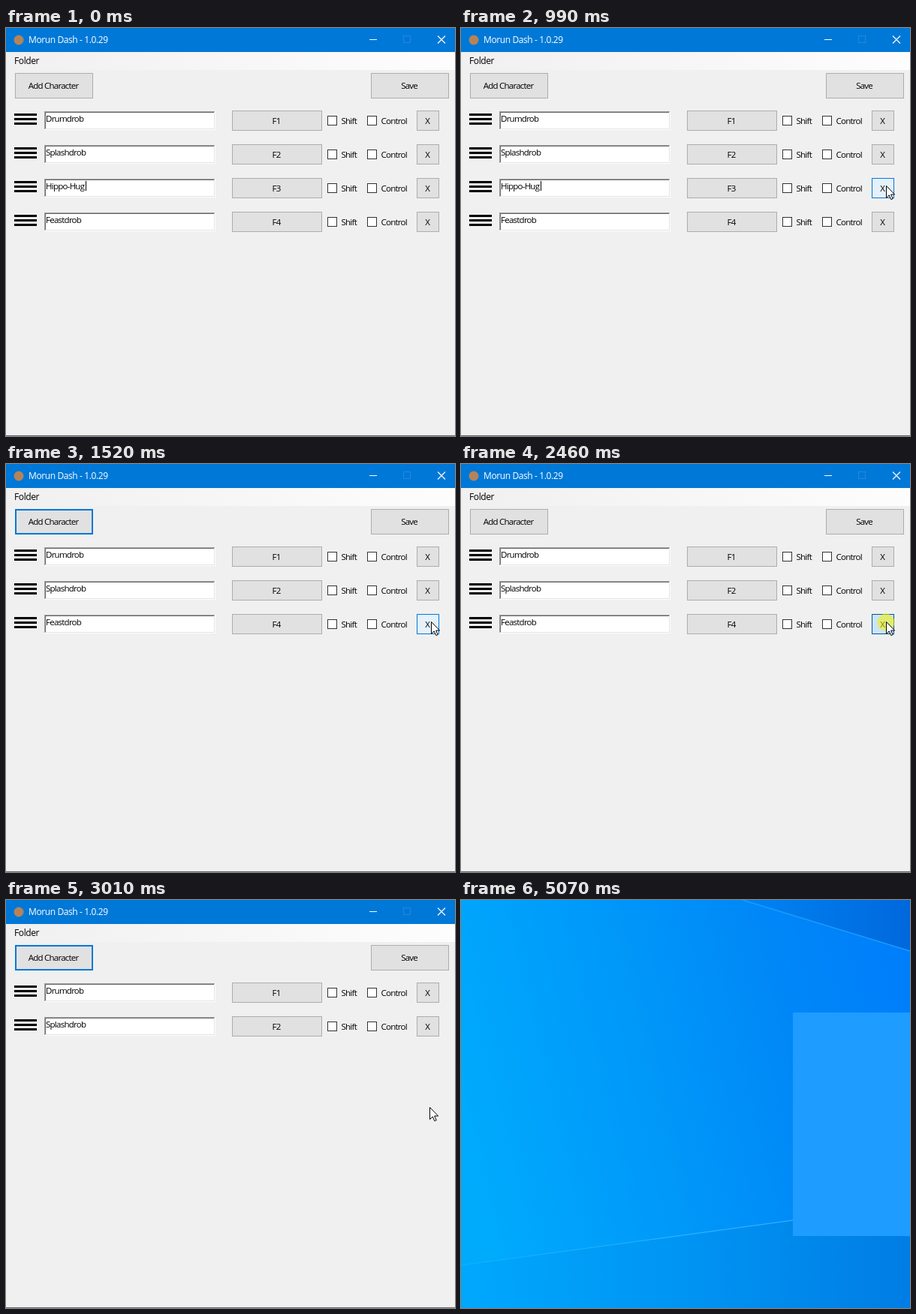
An HTML page that plays this animation: 598 by 544 pixels, repeating every 5160 ms.

```html
<!DOCTYPE html>
<html lang="en">
<head>
<meta charset="utf-8">
<title>Key binding window</title>
<style>
  html, body { margin: 0; width: 100%; height: 100%; overflow: hidden; background: #f0f0f0; }
  svg { display: block; width: 598px; height: 544px; }
  rect { shape-rendering: crispEdges; }
  text { font: 11.5px "Open Sans", "Noto Sans", sans-serif; letter-spacing: -.75px; fill: #000; white-space: pre; }
  .bar { font-size: 12px; letter-spacing: -.4px; }
  .mid { text-anchor: middle; }
</style>
</head>
<body>
<svg id="stage" viewBox="0 0 598 544"></svg>
<script>
const LOOP = 5160, PITCH = 45;
const ROWS = ["Drumdrob", "Splashdrob", "Hippo-Hug", "Feastdrob"];

const box = (x, y, w, h, fill, extra = "") =>
  `<rect x="${x}" y="${y}" width="${w}" height="${h}" fill="${fill}" ${extra}/>`;
const label = (x, y, str, cls = "") => `<text x="${x}" y="${y}" class="${cls}">${str}</text>`;
const frame = (x, y, w, h, fill, line, weight = 1) =>
  box(x, y, w, h, line) + box(x + weight, y + weight, w - 2 * weight, h - 2 * weight, fill);
const button = (x, y, w, h, str, fill = "#e1e1e1", line = "#adadad", weight = 1) =>
  frame(x, y, w, h, fill, line, weight) + label(x + w / 2 - .9, y + h / 2 + 4.3, str, "mid");
const check = (x, str) => frame(x, 117, 13, 13, "#fff", "#333") + label(x + 18.5, 128, str);

function field(x, y, w, h) {
  return box(x, y, w, h, "#fff") +
    box(x, y, w - 1, 1, "#a0a0a0") + box(x, y, 1, h - 1, "#a0a0a0") +
    box(x + 1, y + 1, w - 3, 1, "#696969") + box(x + 1, y + 1, 1, h - 3, "#696969") +
    box(x + 1, y + h - 2, w - 2, 1, "#e3e3e3") + box(x + w - 2, y + 1, 1, h - 2, "#e3e3e3");
}

function row(name, i) {
  const grip = [114, 120, 126].map(y => box(11, y, 30, 3, "#000")).join("");
  return `<g id="row${i}" transform="translate(0 ${i * PITCH})">${grip}
    ${field(51, 111, 228, 25)}${label(53, 125, name)}
    ${button(301, 110, 120, 27, "F" + (i + 1))}
    ${check(428, "Shift")}${check(481, "Control")}
    ${button(547, 110, 30, 27, "X")}</g>`;
}

const ramp = (id, dir, ...stops) => `<linearGradient id="${id}" ${dir}>` +
  stops.map(([at, color]) => `<stop offset="${at}" stop-color="${color}"/>`).join("") + "</linearGradient>";

const defs = `<defs>
  ${ramp("menu", "", [0, "#f0f0f0"], [1, "#fdfdfd"])}
  ${ramp("sky", 'x1="0" y1=".62" x2="1" y2=".4"', [0, "#00abfc"], [.45, "#0097f9"], [.75, "#0088f7"], [1, "#007ffa"])}
  ${ramp("floor", "", [0, "#00a8fc"], [.5, "#0094f3"], [1, "#007de4"])}
  ${ramp("corner", "", [0, "#0084f4"], [1, "#0068dc"])}
  ${ramp("ray", "", [0, "#10b0ff"], [1, "#38b6ff"])}
</defs>`;

const app = `<g id="app">
  ${box(0, 0, 598, 544, "#f0f0f0")}
  ${box(0, 0, 598, 32, "#0078d7")}
  <circle cx="17" cy="16" r="6.5" fill="#b5835a"/>
  <text x="30" y="20" class="bar" style="fill:#fff">Morun Dash - 1.0.29</text>
  ${box(484, 15, 10, 1, "#fff")}
  ${frame(529, 10, 10, 10, "#0078d7", "#2488db")}
  <path d="M575 10.5l10 10m0-10l-10 10" stroke="#fff" stroke-width="1.1"/>
  ${box(0, 32, 598, 24, "url(#menu)")}
  ${label(11, 48, "Folder", "bar")}
  ${button(12, 60, 104, 34, "Add Character")}
  <g id="focus">${button(12, 60, 104, 34, "Add Character", "#e1e1e1", "#0078d7", 2)}</g>
  ${button(486, 60, 104, 34, "Save")}
  ${ROWS.map(row).join("")}
  <g id="hover">${button(547, 200, 30, 27, "X", "#e5f1fb", "#0078d7")}</g>
  <g id="press">${button(547, 200, 30, 27, "X", "#cce4f7", "#005499")}
    <circle cx="566" cy="211" r="11.5" fill="#f2f200" opacity=".55"/></g>
  <g id="caret">${box(106, 204, 1, 13, "#000")}</g>
  <path id="cursor" d="M.5 .5V16.5L4.2 12.9L6.8 18.6L9.2 17.6L6.6 12H11.6Z" fill="#fff" stroke="#000"/>
  ${box(0, 543, 598, 1, "#6a6a6a")}
</g>`;

const desktop = `<g id="desktop">
  ${box(0, 0, 598, 544, "url(#sky)")}
  <path d="M375 0H598V68Z" fill="url(#corner)"/>
  <path d="M375 0L598 68" stroke="#1a9cff" stroke-width="1.5"/>
  <path d="M0 487L442 427L598 450V544H0Z" fill="url(#floor)"/>
  <path d="M0 487L442 427" stroke="url(#ray)" stroke-width="1.2"/>
  ${box(442, 150, 298, 298, "#1e9cff")}
</g>`;

const stage = document.getElementById("stage");
stage.innerHTML = defs + app + desktop;
const $ = id => document.getElementById(id);
const show = (id, on) => { $(id).style.display = on ? "" : "none"; };
const within = (t, a, b) => t >= a && t < b;
const clamp = v => Math.max(0, Math.min(1, v));

function pointer(t) {
  if (t < 740 || t >= 3200) return null;
  if (t < 990) {
    const p = Math.floor((t - 740) / 31.25) / 8;
    const u = 1 - (1 - p) ** 2;
    return [596 - 30 * u, 329 - 119 * u];
  }
  if (t < 2880) return [566, 210];
  const q = Math.floor((t - 2880) / 32 + .001) + 1;
  return [Math.max(564, 566 - 3.6 * q + .64 * q * q), 210 + 66 * (q / 5) ** 1.31];
}

function hoverLevel(t) {
  if (t < 1220) return clamp(Math.floor((t - 900) / 30) / 3);
  if (within(t, 1320, 2460)) return clamp(Math.floor((t - 1320) / 100) / 2);
  return 0;
}

function draw(t) {
  show("desktop", t >= 5070);
  show("caret", t < 200 || within(t, 740, 1220));
  show("focus", within(t, 1320, 2460) || t >= 2560);
  show("press", within(t, 1220, 1320) || within(t, 2460, 2560));
  show("row2", t < 1320);
  show("row3", t < 2560);
  $("row3").setAttribute("transform", `translate(0 ${(t < 1320 ? 3 : 2) * PITCH})`);
  $("hover").setAttribute("opacity", hoverLevel(t));
  const at = pointer(t);
  show("cursor", at);
  if (at) $("cursor").setAttribute("transform", `translate(${at.map(Math.round)})`);
}

const start = performance.now();
function tick() {
  draw((performance.now() - start) % LOOP);
  requestAnimationFrame(tick);
}
tick();
</script>
</body>
</html>
```
